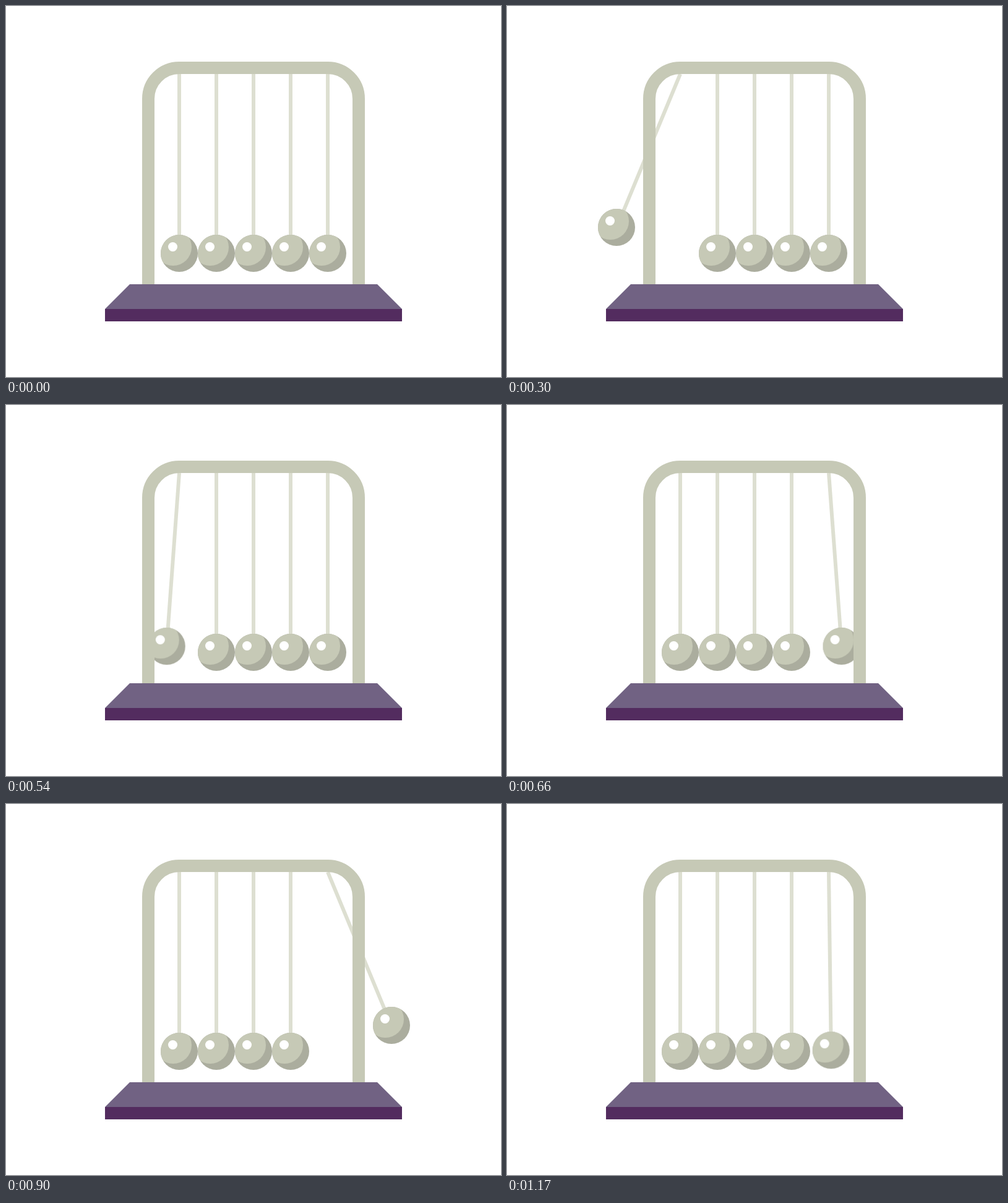
An HTML page for the animation above (1200 ms loop, 800 px wide and 600 px high).

```html
<!DOCTYPE html>
<html lang="en">
<head>
<meta charset="utf-8">
<title>Newton's cradle</title>
<style>
  html, body { margin: 0; width: 100%; height: 100%; overflow: hidden; background: #fff; }
  svg { display: block; width: 800px; height: 600px; }

  .string { stroke: #dddfd1; stroke-width: 6; }
  .metal { fill: #c6c9b6; }
  .shade { fill: #abad9e; }
  .frame { fill: none; stroke: #c6c9b6; stroke-width: 20; }

  .left { --dir: 1; --delay: 0s; }
  .right { --dir: -1; --delay: -.6s; }
  .swing .string { animation: tilt 1.2s var(--delay) infinite; }
  .swing .ball { animation: lift 1.2s var(--delay) infinite; }

  /* Each step lasts 30 ms */
  @keyframes tilt {
    0% { transform: rotate(0deg); animation-timing-function: steps(2); }
    5%, 45% { transform: rotate(calc(var(--dir) * 4.2deg)); }
    5% { animation-timing-function: steps(4); }
    15%, 35% { transform: rotate(calc(var(--dir) * 13.2deg)); animation-timing-function: steps(4); }
    25% { transform: rotate(calc(var(--dir) * 22.5deg)); animation-timing-function: steps(4); }
    45% { animation-timing-function: steps(2); }
    50%, 100% { transform: rotate(0deg); }
  }
  @keyframes lift {
    0% { transform: translate(0px, 0px); animation-timing-function: steps(2); }
    5%, 45% { transform: translate(calc(var(--dir) * -20.4px), -9.9px); }
    5% { animation-timing-function: steps(4); }
    15%, 35% { transform: translate(calc(var(--dir) * -61.8px), -27px); animation-timing-function: steps(4); }
    25% { transform: translate(calc(var(--dir) * -103px), -42px); animation-timing-function: steps(4); }
    45% { animation-timing-function: steps(2); }
    50%, 100% { transform: translate(0px, 0px); }
  }
</style>
</head>
<body>
<svg viewBox="0 0 800 600">
  <defs>
    <clipPath id="round"><circle r="30"/></clipPath>
    <path id="cord" d="M0 0V265"/>
    <g id="sphere">
      <circle class="shade" r="30"/>
      <circle class="metal" cx="-10" cy="-10" r="30" clip-path="url(#round)"/>
      <circle cx="-10.5" cy="-10.5" r="7.5" fill="#fff"/>
    </g>
    <g id="pendulum">
      <use href="#cord" class="string"/>
      <use href="#sphere" y="290"/>
    </g>
  </defs>

  <use href="#pendulum" x="340" y="110"/>
  <use href="#pendulum" x="400" y="110"/>
  <use href="#pendulum" x="460" y="110"/>

  <g class="swing left" transform="translate(280 110)">
    <path class="string" d="M0 0V265"/>
    <g class="ball"><use href="#sphere" y="290"/></g>
  </g>
  <g class="swing right" transform="translate(520 110)">
    <path class="string" d="M0 0V265"/>
    <g class="ball"><use href="#sphere" y="290"/></g>
  </g>

  <path class="frame" d="M230 450V150a50 50 0 0 1 50-50H520a50 50 0 0 1 50 50V450"/>
  <path d="M200 450H600L640 490H160Z" fill="#716283"/>
  <path d="M160 490H640V510H160Z" fill="#532c5f"/>
</svg>
</body>
</html>
```
